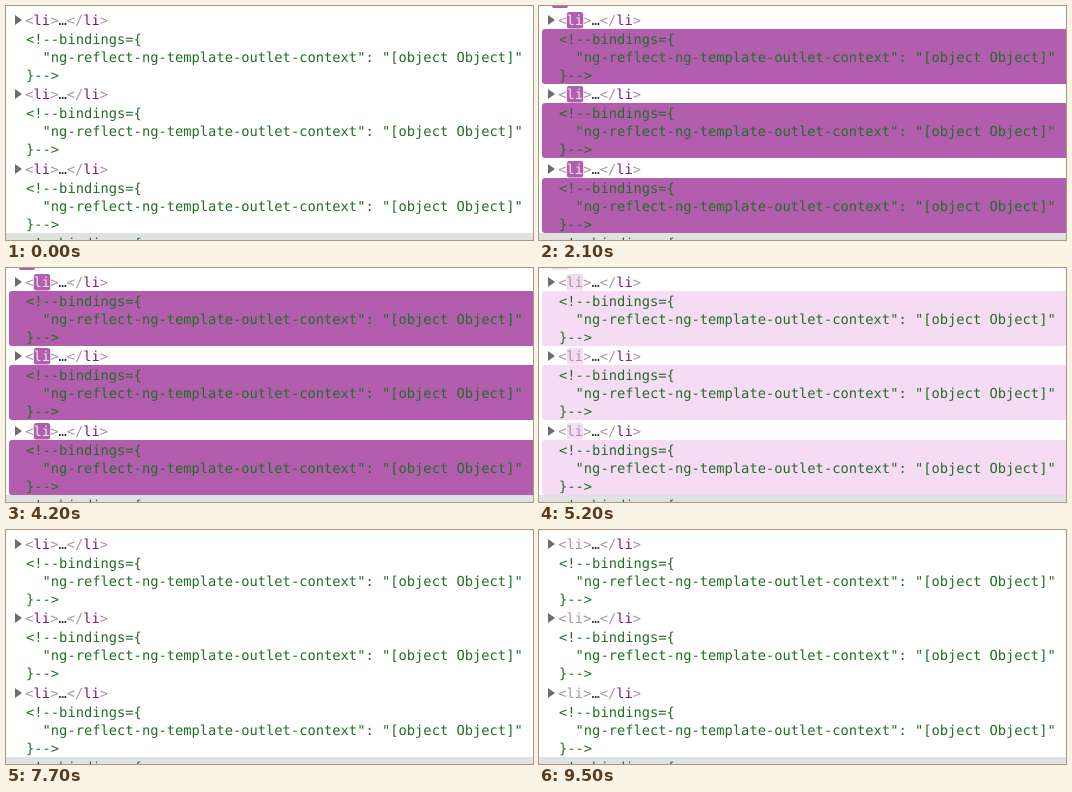
Animation, 527 px wide and 234 px high, one loop 9.7 s. Source, as an HTML page:

```html
<!DOCTYPE html>
<html lang="en">
<head>
<meta charset="utf-8">
<title>Element tree flashes</title>
<style>
html, body { margin: 0; width: 100%; height: 100%; overflow: hidden; background: #fff; }
svg { display: block; width: 527px; height: 234px; }
text {
  font: 13.75px "DejaVu Sans Mono", "Noto Sans Mono", monospace;
  white-space: pre;
  text-rendering: geometricPrecision;
}
.tag { fill: rgb(168, 148, 166); }
.name { fill: rgb(136, 18, 128); }
.dots { fill: rgb(48, 57, 66); }
.note { fill: rgb(35, 110, 37); }
.arrow { fill: #6e6e6e; }
.hover { fill: #e0e2e1; }
</style>
</head>
<body>
<svg id="stage" viewBox="0 0 527 234"></svg>
<script>
const LOOP = 9700, STEP = 100;
const LENGTH = 1400, TURN = 0.8 * LENGTH;
const LEAD = 80; // age of a flash when it first shows

// Moments the view is stuck, and how late it then runs
const holds = [
  { from: 2400, to: 2700, lag: 30 },
  { from: 3000, to: 3200, lag: 30 },
  { from: 6700, to: 6900, lag: 100 }
];
const starts = [100, 2100, 4200, 6200, 8200];

const WHITE = [255, 255, 255];
const DEEP = [158, 54, 153];
const PALE = [245, 219, 244];
const TAG = [168, 148, 166];

const stage = document.getElementById("stage");

const box = (x, y, w, h, r) =>
  `<rect class="flash" x="${x}" y="${y}" width="${w}" height="${h}" rx="${r}"/>`;
const line = (x, y, body) => `<text class="note" x="${x}" y="${y}">${body}</text>`;
const span = (kind, body) => `<tspan class="${kind}">${body}</tspan>`;

function block(y) {
  return `<g transform="translate(0 ${y})">` +
    box(3, 23, 530, 55, 3) + box(27.8, 6, 16.4, 16.5, 2.5) +
    `<path class="arrow" d="M9 9L16 14L9 19Z"/>` +
    `<text x="19.3" y="19">` + span("tag", "&lt;") + span("name live", "li") +
    span("tag", "&gt;") + span("dots", "…") + span("tag", "&lt;/") +
    span("name", "li") + span("tag", "&gt;") + `</text>` +
    line(20, 38, "&lt;!--bindings={") +
    line(20, 56, '  "ng-reflect-ng-template-outlet-context": "[object Object]"') +
    line(20, 74, "}--&gt;") + `</g>`;
}

stage.innerHTML = box(13, -10, 16, 12, 2) + [0, 74, 149].map(block).join("") +
  `<rect class="hover" y="227" width="527" height="7"/>` +
  line(20, 242, "&lt;!--bindings={");

const flashes = stage.querySelectorAll(".flash");
const names = stage.querySelectorAll(".live");

// cubic-bezier(0, 0, 0.2, 1)
function ease(x) {
  let lo = 0, hi = 1;
  for (let i = 0; i < 24; i++) {
    const s = (lo + hi) / 2;
    if (0.6 * s * s + 0.4 * s * s * s < x) lo = s; else hi = s;
  }
  return lo * lo * (3 - 2 * lo);
}

const mix = (a, b, k) =>
  `rgb(${a.map((v, i) => Math.round(v + (b[i] - v) * k)).join(",")})`;

function age(t) {
  const start = starts.filter(s => s <= t).pop();
  if (start === undefined) return LENGTH;
  let now = t, lag = 0;
  for (const h of holds) {
    if (h.from < start || t < h.from) continue;
    if (t < h.to) now = h.from; else lag = h.lag;
  }
  return now - start + LEAD - lag;
}

function draw(t) {
  const e = age(Math.floor(t / STEP) * STEP);
  let back = "none", ink = "";
  if (e < TURN) {
    const k = ease(e / TURN);
    back = mix(DEEP, PALE, k);
    ink = mix(WHITE, TAG, k);
  } else if (e < LENGTH) {
    back = mix(PALE, WHITE, ease((e - TURN) / (LENGTH - TURN)));
    ink = mix(TAG, TAG, 0);
  }
  flashes.forEach(f => f.style.fill = back);
  names.forEach(n => n.style.fill = ink);
}

const begin = performance.now();
function tick() {
  draw((performance.now() - begin) % LOOP);
  requestAnimationFrame(tick);
}
tick();
</script>
</body>
</html>
```
